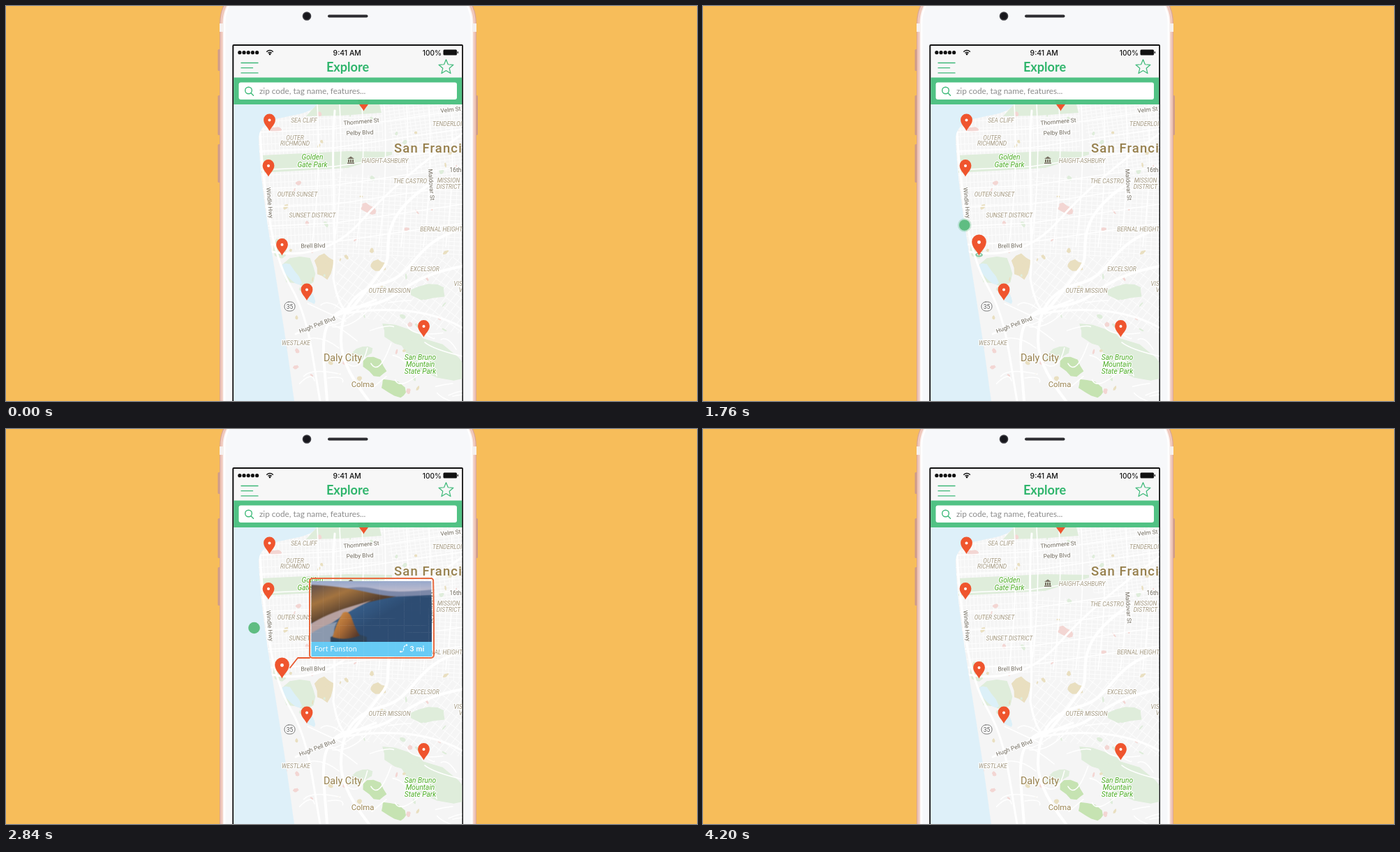
An HTML page with a canvas that plays this animation: 990 by 566 pixels, repeating every 4.32 s.

```html
<!DOCTYPE html>
<html lang="en">
<head>
<meta charset="utf-8">
<title>Explore map</title>
<style>
html, body { margin: 0; width: 100%; height: 100%; overflow: hidden; background: #f7bd5a; }
canvas { display: block; }
</style>
</head>
<body>
<canvas id="stage" width="990" height="566"></canvas>
<script>
const W = 990, H = 566, LOOP = 4320, STEP = 40;
const GREEN = '#3db978', ORANGE = '#ef552e', DOT = '#5fbd82', INK = '#111';
const SCREEN = [326.3, 57, 326.9, 520];
const stage = document.getElementById('stage').getContext('2d');

let seed = 7;
const random = (from = 0, to = 1) => {
  seed = seed * 16807 % 2147483647;
  return from + (to - from) * seed / 2147483647;
};

function layer(w, h) {
  const c = document.createElement('canvas');
  c.width = w; c.height = h;
  return c.getContext('2d');
}
function fill(g, color, path) {
  g.fillStyle = color;
  g.fill(new Path2D('M' + path + 'Z'));
}
function line(g, color, width, path) {
  g.strokeStyle = color; g.lineWidth = width;
  g.lineJoin = g.lineCap = 'round';
  g.stroke(new Path2D('M' + path));
}
function disc(g, color, x, y, r) {
  g.fillStyle = color;
  g.beginPath(); g.arc(x, y, Math.max(0, r), 0, 7); g.fill();
}
function box(g, color, x, y, w, h, r = 0) {
  g.fillStyle = color;
  g.beginPath(); g.roundRect(x, y, w, h, r); g.fill();
}
function text(g, str, x, y, font, color, align = 'left') {
  g.font = font; g.fillStyle = color; g.textAlign = align;
  g.textBaseline = 'alphabetic';
  g.fillText(str, x, y);
}
function gradient(g, x0, y0, x1, y1, ...colors) {
  const ramp = g.createLinearGradient(x0, y0, x1, y1);
  colors.forEach((c, i) => ramp.addColorStop(i / (colors.length - 1), c));
  return ramp;
}
// Points `count` steps around a centre, at the radius given by a rule
function ring(count, radius) {
  return Array.from({ length: count }, (_, i) => {
    const a = i / count * 2 * Math.PI, r = radius(i);
    return [r * Math.sin(a), -r * Math.cos(a)];
  }).join(' ');
}
// Irregular patch of land or water
function patch(g, color, x, y, rx, ry, turn = 0) {
  g.save();
  g.translate(x, y); g.rotate(turn); g.scale(rx, ry);
  fill(g, color, ring(11, () => random(.75, 1.15)));
  g.restore();
}
function pin(g, x, tip, scale = 1) {
  g.save();
  g.translate(x, tip); g.scale(scale, scale);
  fill(g, ORANGE, '0 0C-2-5-8.4-9-8.4-16A8.4 8.4 0 0 1 8.4-16C8.4-9 2-5 0 0');
  disc(g, '#fff', 0, -15.5, 2);
  g.restore();
}

// Fine streets inside a polygon
function grid(g, area, angle, dx, dy) {
  g.save();
  g.clip(new Path2D('M' + area + 'Z'));
  g.translate(490, 340); g.rotate(angle);
  g.strokeStyle = 'rgba(255,255,255,.8)'; g.lineWidth = 1;
  g.beginPath();
  for (let x = -400; x < 400; x += dx) { g.moveTo(x, -400); g.lineTo(x, 400); }
  for (let y = -400; y < 400; y += dy) { g.moveTo(-400, y); g.lineTo(400, y); }
  g.stroke();
  g.restore();
}

function drawLand(g) {
  const park = '#dfeddb', lawn = '#c6e3b2', sand = '#e9dfc0', pink = '#f3d6d3', lake = '#dcf0f8';
  const land = '445 141C430 166 366 148 362 190C366 290 392 400 413 566L654 566 654 141Z';
  box(g, '#def0f9', 326, 141, 328, 425);
  fill(g, '#f5f5f5', land);
  g.save();
  g.clip(new Path2D('M' + land));

  grid(g, '360 141H540V205L475 240V350H360', -.045, 5.5, 11);
  grid(g, '540 141H654V250L560 235', -.13, 7, 5);
  grid(g, '475 240 654 250V360H475', .05, 8, 6);
  grid(g, '475 360H654V470L470 440', .65, 9, 13);

  fill(g, park, '430 158 445 141H535L538 153 480 157');
  fill(g, park, '366 214 490 208 553 209V213L490 232 366 239');
  patch(g, park, 393, 347, 10, 16);
  patch(g, park, 421, 381, 25, 22);
  patch(g, lake, 409, 383, 20, 7, .9);
  patch(g, lake, 435, 415, 15, 6, 1);
  patch(g, park, 606, 410, 26, 12, -.1);
  patch(g, park, 571, 474, 36, 15, .35);
  patch(g, park, 614, 506, 54, 22, .5);
  patch(g, park, 506, 499, 20, 10, -.5);
  patch(g, lawn, 529, 518, 18, 12, .6);
  patch(g, lawn, 556, 549, 22, 11, .5);
  patch(g, sand, 456, 373, 14, 18);
  patch(g, sand, 533, 372, 13, 8);
  patch(g, pink, 519, 291, 12, 7, .5);
  patch(g, pink, 385, 177, 9, 4);
  for (let i = 0; i < 70; i++) {
    patch(g, [park, sand, pink][i % 3], random(400, 650), random(145, 560), random(1, 5), random(1, 4), random(0, 3));
  }

  const road = (width, path) => line(g, '#fff', width, path);
  for (let i = 0; i < 7; i++) {
    const y = 181 + 27 * i, x = 446 + 32 * i;
    road(1.6, `362 ${y}L470 ${y - 5}`);
    road(1.6, `470 ${y - 5}L654 ${y - 32}`);
    road(1.6, `${x} 141Q${x + 6} 240 ${x - 8} 345`);
  }
  for (let i = 0; i < 26; i++) {
    const x = random(415, 640), y = random(425, 560);
    road(1.5, `${x} ${y}q${random(5, 30)} ${random(-20, 20)} ${random(20, 60)} ${random(-30, 30)}`);
  }
  road(3, '364 180C369 260 378 350 407 400S438 500 450 566');
  road(3, '471 150C464 235 475 330 469 390Q475 428 489 440');
  road(3, '654 183Q560 250 509 308T380 352');
  road(4, '654 319C580 340 590 385 538 398S480 450 480 480 500 540 520 566');
  road(4, '615 250C520 310 560 350 541 375S500 430 489 440');
  road(4, '654 373C560 390 570 425 505 431S455 490 460 566');
  road(3, '415 470Q480 440 530 421');
  road(3, '489 440Q590 425 654 461');
  g.restore();
}

function drawLabels(g) {
  const area = ['italic 8.4px Roboto, sans-serif', '#a2977f', 8.5];
  const street = ['8.5px Roboto, sans-serif', '#6f695c', 9];
  const park = ['italic 10.2px Roboto, sans-serif', '#4fae28', 10.4];
  const town = ['14.3px Roboto, sans-serif', '#97804d', 14];
  const village = ['11.3px Roboto, sans-serif', '#97804d', 11];
  const label = ([font, color, leading], str, x, y, turn = 0) => {
    g.save();
    g.translate(x, y); g.rotate(turn);
    g.font = font; g.textAlign = 'center'; g.textBaseline = 'middle';
    g.lineJoin = 'round'; g.lineWidth = 2.5;
    g.strokeStyle = 'rgba(255,255,255,.8)'; g.fillStyle = color;
    const rows = str.split('\n');
    rows.forEach((row, i) => {
      const dy = (i - (rows.length - 1) / 2) * leading;
      g.strokeText(row, 0, dy); g.fillText(row, 0, dy);
    });
    g.restore();
  };
  label(area, 'SEA CLIFF', 427, 165);
  label(area, 'OUTER\nRICHMOND', 414, 193.5);
  label(area, 'HAIGHT-ASHBURY', 543, 223);
  label(area, 'TENDERLOIN', 635, 169.5);
  label(area, 'THE CASTRO', 579, 252);
  label(area, 'MISSION\nDISTRICT', 634, 255);
  label(area, 'OUTER SUNSET', 417.5, 271);
  label(area, 'SUNSET DISTRICT', 439, 301);
  label(area, 'BERNAL HEIGHTS', 626, 320.5);
  label(area, 'EXCELSIOR', 600, 378);
  label(area, 'OUTER MISSION', 549.5, 408.5);
  label(area, 'VISITACION\nVALLEY', 663, 403);
  label(area, 'WESTLAKE', 415.5, 483.5);
  label(street, 'Thornmere St', 509, 166, -.09);
  label(street, 'Pelby Blvd', 507, 182, -.04);
  label(street, 'Velm St', 637, 149, -.1);
  label(street, '16th', 644, 235.5);
  label(street, 'Maldovar St', 609, 256, 1.5);
  label(street, 'Windle Hwy', 377.5, 282, 1.48);
  label(street, 'Brell Blvd', 440, 344, -.02);
  label(street, 'Hugh Pell Blvd', 446, 457, -.36);
  label(park, 'Golden\nGate Park', 439, 222.5);
  label(park, 'San Bruno\nMountain\nState Park', 593.5, 514);
  label(town, 'Daly City', 482.5, 504.5);
  label(village, 'Colma', 511, 543);
  g.letterSpacing = '1.1px';
  text(g, 'San Francisco', 556, 209.5, '500 18.5px Roboto, sans-serif', '#97804d');
  g.letterSpacing = '0px';
}

function drawMap(g) {
  g.save();
  g.beginPath(); g.rect(...SCREEN); g.clip();
  drawLand(g);
  // Museum and route marker
  fill(g, '#776f61', '489 219 494 215.5 499 219');
  for (let x = 490; x < 498; x += 3) g.fillRect(x, 220, 2, 4);
  g.fillRect(489, 224.5, 10, 1.5);
  box(g, '#fff', 399, 424, 15, 13, 6);
  g.strokeStyle = '#777'; g.lineWidth = 1; g.stroke();
  text(g, '35', 406.5, 433.5, '8.5px Roboto, sans-serif', '#555', 'center');
  drawLabels(g);
  g.restore();
  [[377.5, 179], [376, 244.5], [431, 422], [598.5, 474.5], [512.5, 150.5]].forEach(p => pin(g, ...p));
}

function drawPhone(g) {
  box(g, '#f7bd5a', 0, 0, W, H);
  [[62, 31], [128, 57], [198, 55]].forEach(([y, h]) => box(g, '#cf9c8b', 303.5, y, 4, h, 1.5));
  box(g, '#cf9c8b', 672, 128, 4, 57, 1.5);
  // Nested shells from the metal rim to the glass
  const rim = ['#dba898', '#f3cfc4', '#eec3b6', '#f8e6e1', '#fff', '#fff', '#f7f8fa'];
  rim.forEach((color, i) => {
    const d = 1.4 * i;
    box(g, color, 306 + d, -36 + d, 368 - 2 * d, 700, 60 - d);
  });
  g.fillStyle = '#f6f1ef';
  g.fillRect(306, 25, 6, 12); g.fillRect(668, 25, 6, 12);
  disc(g, '#3b3b40', 431, 14.5, 6.3);
  disc(g, '#17171c', 431, 14.5, 4.8);
  line(g, '#2c2c30', 4, '463 14.5H516.5');
  box(g, INK, 324.3, 55, 330.7, 520, 2);
  box(g, '#f7f7f7', ...SCREEN);
}

function drawBars(g) {
  for (let i = 0; i < 5; i++) disc(g, INK, 334.8 + i * 6.2, 66.7, 2.6);
  g.strokeStyle = INK; g.lineWidth = 1.5; g.lineCap = 'butt';
  [3.6, 6.4].forEach(r => { g.beginPath(); g.arc(378, 70, r, -2.4, -.75); g.stroke(); });
  disc(g, INK, 378, 69, 1.4);
  text(g, '9:41 AM', 488.7, 70.7, '500 10.4px Inter, sans-serif', INK, 'center');
  text(g, '100%', 624, 70.7, '500 10.1px Inter, sans-serif', INK, 'right');
  box(g, INK, 626.5, 62.5, 19.5, 8, 1.5);
  box(g, INK, 646.7, 65, 1.3, 3, .6);

  [24, 16.5, 24].forEach((w, i) => line(g, GREEN, 1.3, `337 ${81.5 + 7.2 * i}h${w}`));
  text(g, 'Explore', 489.5, 94, 'bold 18.1px Lato, sans-serif', '#2fb56c', 'center');
  g.save();
  g.translate(630.5, 87.7);
  line(g, GREEN, 1.2, ring(10, i => i % 2 ? 4.9 : 11) + 'Z');
  g.restore();

  box(g, 'rgba(76,193,128,.97)', 326.3, 102.5, 326.9, 38.5);
  box(g, '#fff', 333.5, 109.5, 312.5, 24.5, 3);
  g.strokeStyle = GREEN; g.lineWidth = 1.4;
  g.beginPath(); g.arc(347.5, 121, 4.8, 0, 7); g.stroke();
  line(g, GREEN, 1.4, '351 124.7 354.5 128.2');
  text(g, 'zip code, tag name, features...', 363, 125.6, '11.8px Lato, sans-serif', '#8c8c8c');
}

// Callout card, drawn once at double size
const CW = 178, CH = 114, PAD = 4;
function drawPhoto(g) {
  g.save();
  g.beginPath(); g.rect(2.5, 4, 172.5, 87); g.clip();
  box(g, gradient(g, 0, 4, 0, 24, '#97a8cb', '#cdc3cf'), 0, 0, CW, 26);
  g.filter = 'blur(1.6px)';
  box(g, gradient(g, 0, 22, 40, 91, '#93a7bd', '#52789f', '#355b86', '#2d4c72'), -5, 23, CW + 10, 75);
  fill(g, '#7c88a8', '30 20Q65 8 95 15T178 16V24L30 30');
  fill(g, gradient(g, 0, 10, 20, 60, '#5f4f4c', '#a3733f', '#57402f'), '-5 9Q40 10 80 19T130 25Q80 33 50 45T-5 68');
  fill(g, '#b7a1a0', '-5 70Q20 52 60 40T92 30Q60 44 38 60T-5 86');
  fill(g, '#8b99ae', '-5 84Q20 66 40 62Q30 78 42 86T-5 95');
  fill(g, '#2f4359', '30 84Q60 74 82 84V95H30');
  fill(g, gradient(g, 38, 50, 72, 76, '#d59147', '#a96a35', '#5a3b2b'), '33 84Q38 64 48 49Q57 45 61 58T72 82Q50 90 33 84');
  g.restore();
}
function makeCard() {
  const g = layer((CW + 2 * PAD) * 2, (CH + 2 * PAD) * 2);
  g.scale(2, 2); g.translate(PAD, PAD);
  drawPhoto(g);
  box(g, '#67cbf5', 2.5, 91, 173, 21, 1);
  g.letterSpacing = '.2px';
  text(g, 'Fort Funston', 7, 104.5, '10.4px Lato, sans-serif', '#fff');
  text(g, '3 mi', 143.5, 104.5, 'bold 10.6px Lato, sans-serif', '#fff');
  g.setLineDash([2.5, 2]);
  line(g, '#fff', 1.1, '131 105C137 106 132 98 138 96');
  g.setLineDash([]);
  disc(g, '#fff', 130.5, 105, 1.3);
  disc(g, '#fff', 139, 95.5, 1.3);
  g.strokeStyle = '#e86a40'; g.lineWidth = 2;
  g.beginPath(); g.roundRect(0, 0, CW, CH, 4); g.stroke();
  return g.canvas;
}

const base = layer(W, H);
drawPhone(base);
drawMap(base);
drawBars(base);
const card = makeCard();

const part = (t, from, to) => Math.min(1, Math.max(0, (t - from) / (to - from)));
const mix = (a, b, k) => a + (b - a) * k;
const easeOut = k => 1 - (1 - k) ** 3;
const easeInOut = k => k < .5 ? 2 * k * k : 1 - 2 * (1 - k) ** 2;
const wobble = (s, half) => Math.exp(-.0057 * Math.max(0, s)) * Math.cos(s * Math.PI / half);

// The sheet grows from its lower left while its free corner swings and its edges bow
function bend(x, y, swayX, swayY, size) {
  const u = x / CW, v = y / CH, top = 1 - v;
  const dx = 24 * v * top * (2 * u - 1) - 35 * u * top - 2 * u * v;
  const dy = top * (48 * u * (1 - u) - 8 * u) + v * 10 * u * (1 - u);
  return [435 + size * (x + swayX * dx), 328 + size * (y - CH + swayY * dy)];
}
function drawSheet(g, ...pose) {
  const nx = 16, ny = 12, cw = (CW + 2 * PAD) / nx, ch = (CH + 2 * PAD) / ny;
  for (let i = 0; i < nx; i++) for (let j = 0; j < ny; j++) {
    const x = i * cw - PAD, y = j * ch - PAD;
    const [ax, ay] = bend(x, y, ...pose);
    const [bx, by] = bend(x + cw, y, ...pose);
    const [cx, cy] = bend(x, y + ch, ...pose);
    g.save();
    g.transform((bx - ax) / cw, (by - ay) / cw, (cx - ax) / ch, (cy - ay) / ch, ax, ay);
    g.drawImage(card, i * cw * 2, j * ch * 2, cw * 2 + 1, ch * 2 + 1, 0, 0, cw + .5, ch + .5);
    g.restore();
  }
}

function drawCallout(g, t) {
  if (t < 2000 || t >= 4160) return;
  const leave = part(t, 3840, 4160);
  g.save();
  g.beginPath(); g.rect(...SCREEN); g.clip();
  g.globalAlpha = 1 - leave;
  g.setLineDash([35 * part(t, 1960, 2080), 99]);
  line(g, '#e8592f', 1.8, '407 342 418 328H435');
  g.setLineDash([]);
  if (t >= 2080 && t < 2860) {
    const s = t - 2240;
    drawSheet(g, wobble(s, 140), wobble(s, 100), easeOut(part(t, 2040, 2240)));
  } else if (t >= 2860) {
    const zoom = 1 + .84 * leave * leave;
    g.translate(495, 273); g.scale(zoom, zoom); g.translate(-495, -273);
    g.drawImage(card, 435 - PAD, 214 - PAD, CW + 2 * PAD, CH + 2 * PAD);
  }
  g.restore();
}

function drawActivePin(g, t) {
  const ripple = part(t, 1640, 2000);
  if (ripple > 0 && ripple < 1) {
    g.save();
    g.globalAlpha = 1 - ripple;
    g.strokeStyle = '#35a878'; g.lineWidth = 1.5;
    g.beginPath(); g.ellipse(395.5, 356.5, 13 * ripple, 4 * ripple + .6, 0, 0, 7); g.stroke();
    g.restore();
  }
  const grow = easeOut(part(t, 1480, 1680)) - easeOut(part(t, 3840, 4080));
  pin(g, 395.5, 357.5, 1 + .23 * grow);
}

function drawDot(g, t) {
  if (t < 120 || t >= 4040) return;
  const stops = [[454, 324], [394, 343], [355.5, 285], [554, 270]];
  const moves = [[960, 1360], [1560, 1960], [3680, 3840]];
  let [x, y] = stops[0], moving = false;
  moves.forEach(([from, to], i) => {
    if (t <= from) return;
    const k = part(t, from, to), e = easeInOut(k);
    x = mix(stops[i][0], stops[i + 1][0], e);
    y = mix(stops[i][1], stops[i + 1][1], e);
    moving = k < 1;
  });
  const age = t - 80;
  const pop = t < 800 ? 1 - Math.exp(-age / 130) * Math.cos(age / 70) : 1;
  const tap = 1 - .22 * Math.sin(Math.PI * part(t, 1360, 1520));
  const r = 8.3 * pop * tap * (1 - part(t, 3840, 4040));
  if (moving) disc(g, 'rgba(95,189,130,.3)', x, y, r + 1.5);
  disc(g, DOT, x, y, moving ? r - .5 : r);
}

function frame(now) {
  const t = Math.floor(now % LOOP / STEP) * STEP;
  stage.drawImage(base.canvas, 0, 0);
  drawActivePin(stage, t);
  drawCallout(stage, t);
  drawDot(stage, t);
  requestAnimationFrame(frame);
}
requestAnimationFrame(frame);
</script>
</body>
</html>
```
